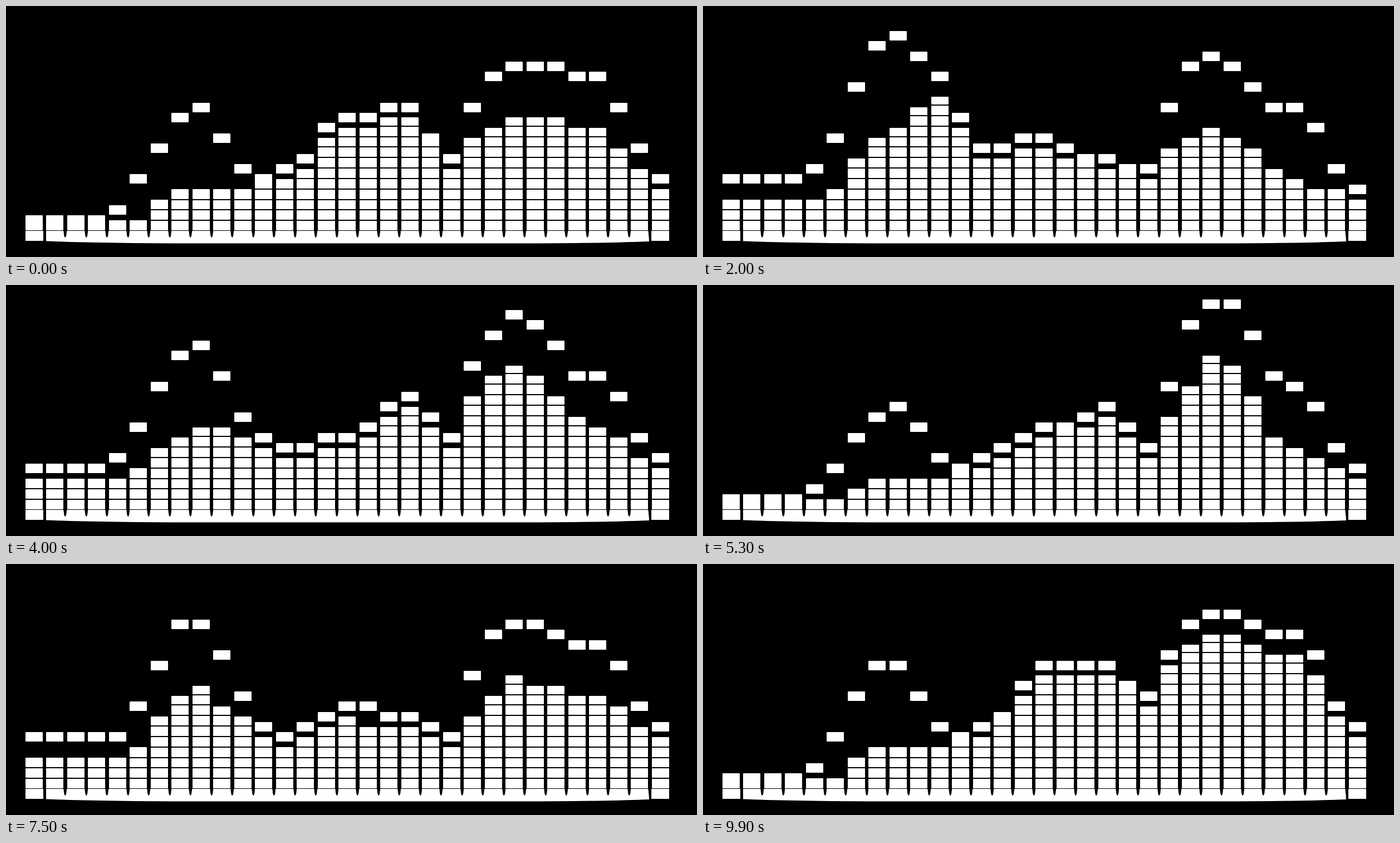
Recreate the animation shown at these times as an HTML page with a canvas. Size 1241 by 451 pixels, loop 10 s.

```html
<!DOCTYPE html>
<html lang="en">
<head>
<meta charset="utf-8">
<title>Equalizer</title>
<style>
  html, body { margin: 0; width: 100%; height: 100%; overflow: hidden; background: #000; }
  canvas { display: block; }
</style>
</head>
<body>
<canvas id="stage" width="1241" height="451"></canvas>
<script>
const ctx = document.getElementById('stage').getContext('2d');
const LOOP = 10000, STEP = 100, COLS = 31, WIDTH = 31, MAX = 19;

const colX = i => Math.floor(35 + 37.5 * i);
const lineY = j => Math.round(404 - 18.82 * j);
const barY = level => Math.floor(385.3 - 18.45 * level);
const capY = level => Math.round(376 - 18.4 * level);

// Columns where the outline bends, and the bar levels there at the main beats.
const BENDS = [4, 8, 10, 12, 15, 18, 20, 21, 23, 27, 30];
// gap: how far the caps float above the bars in the bass, left hump and right hump.
const beats = [
  { at: 0,    bars: [0, 3, 3, 4, 9, 10, 5, 8, 10, 9, 3],   gap: [0, 8, 5] },
  { at: 2000, bars: [2, 9, 12, 6, 7, 5, 4, 7, 9, 4, 2],    gap: [2, 9, 6.5] },
  { at: 4000, bars: [2, 7, 6, 4, 5, 9, 5, 10, 13, 7, 3],   gap: [1, 8, 4.5] },
  { at: 5300, bars: [0, 2, 2, 3, 6, 8, 4, 8, 14, 5, 2],    gap: [0, 7, 6] },
  { at: 6600, bars: [3.4, 12, 8, 4, 8, 4, 3, 5, 7, 5, 3],  gap: [0, 1.5, 6.5] },
  { at: 8300, bars: [1.4, 5, 3, 2, 3, 5, 3, 7, 11, 9, 4],  gap: [2, 10, 3] },
  { at: 9900, bars: [0, 3, 3, 4, 10, 10, 7, 11, 14, 12, 4], gap: [0, 8.5, 2] }
];

const mix = (a, b, u) => a + (b - a) * u;
const mixAll = (a, b, u) => a.map((v, k) => mix(v, b[k], u));

// Smooth curve through the points (xs, ys), flat outside them.
function curve(xs, ys, x) {
  const k = xs.findIndex(p => p >= x);
  if (k < 1) return k ? ys[ys.length - 1] : ys[0];
  const u = (x - xs[k - 1]) / (xs[k] - xs[k - 1]);
  return mix(ys[k - 1], ys[k], u * u * (3 - 2 * u));
}

function levelsAt(t) {
  const n = beats.findLastIndex(b => b.at <= t);
  const a = beats[n], b = beats[n + 1] || a;
  const span = b.at - a.at || 1, u = (t - a.at) / span;
  const bars = mixAll(a.bars, b.bars, u);
  const [bass, left, right] = mixAll(a.gap, b.gap, u);
  const swing = 0.18 * Math.sin(2 * Math.PI * u * Math.round(span / 800));
  const push = 2 * Math.sin(Math.PI * u);
  return Array.from({ length: COLS }, (_, i) => {
    const rest = curve(BENDS, bars, i);
    const gap = curve([3, 7.5, 11, 20, 22, 27, 30], [bass, left, 0.8, 0.8, right, right, 1], i);
    const bar = Math.round(rest * (1 + swing));
    const cap = Math.round(rest + gap + push * (rest + gap) / MAX);
    return { bar, cap: Math.min(MAX, Math.max(cap, bar)) };
  });
}

function block(x, top, bottom) {
  ctx.beginPath();
  ctx.roundRect(x, top, WIDTH, bottom - top, 1);
  ctx.fill();
}

function drawBase() {
  ctx.fillStyle = '#fff';
  ctx.fillRect(35, 404, 32, 18);
  ctx.fillRect(1159, 404, 32, 18);
  ctx.beginPath();
  ctx.moveTo(72, 404);
  ctx.lineTo(1154, 404);
  ctx.lineTo(1155, 423);
  ctx.quadraticCurveTo(1080, 426, 940, 426.5);
  ctx.lineTo(300, 426.5);
  ctx.quadraticCurveTo(150, 425.5, 72, 422.5);
  ctx.fill();
  ctx.fillStyle = '#000';
  for (let i = 1; i < COLS - 1; i++) {
    const x = colX(i) + 34.25;
    ctx.beginPath();
    ctx.moveTo(x - 3, 403);
    ctx.lineTo(x - 2, 412);
    ctx.quadraticCurveTo(x, 420, x + 2, 412);
    ctx.lineTo(x + 3, 403);
    ctx.fill();
  }
}

function draw(t) {
  ctx.fillStyle = '#000';
  ctx.fillRect(0, 0, 1241, 451);
  drawBase();
  ctx.fillStyle = '#fff';
  levelsAt(t).forEach(({ bar, cap }, i) => {
    const x = colX(i);
    for (let j = 0; j <= bar; j++) {
      block(x, j === bar ? barY(bar) : lineY(j + 1) + 1, lineY(j) - 1);
    }
    block(x, capY(cap), capY(cap) + 17);
  });
}

const start = performance.now();
function tick() {
  const t = (performance.now() - start) % LOOP;
  draw(Math.floor(t / STEP) * STEP);
  requestAnimationFrame(tick);
}
tick();
</script>
</body>
</html>
```
